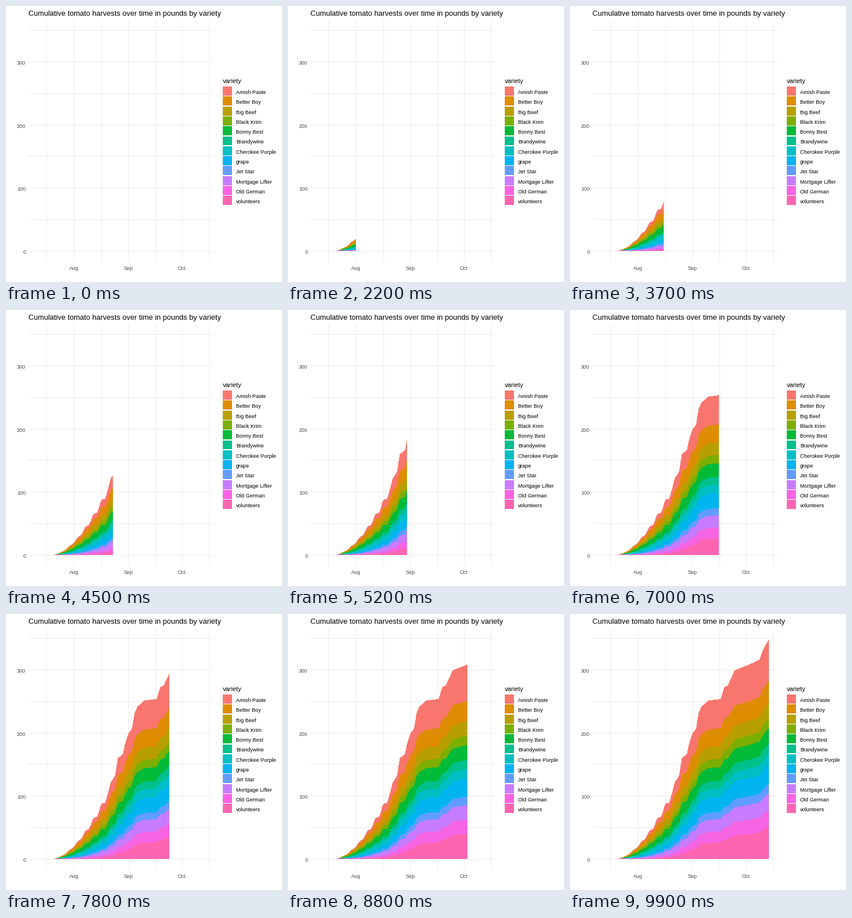
Animation, 480 px wide and 480 px high, one loop 10000 ms. Source, as a matplotlib script:

```python
import numpy as np
import matplotlib.pyplot as plt
from matplotlib.animation import FuncAnimation
from matplotlib.patches import Polygon, Rectangle

plt.rcParams["font.family"] = "Liberation Sans"

SIZE, DPI = 480, 72
FRAMES, INTERVAL = 100, 100
LAST_DAY, FIRST_PICK = 95, 10     # days since 11 July
DAY_0_X, DAY_WIDTH = 53.3, 3.077
BASE, POUND_HEIGHT = 426, 1.097
GRID, TICK = "#EBEBEB", "#4D4D4D"

# name: (colour, pounds at the end, lateness); lateness above 1 ripens late
VARIETIES = {
    "Amish Paste": ("#F8766D", 65.7, 1.15),
    "Better Boy": ("#DE8C00", 34.0, .6),
    "Big Beef": ("#B79F00", 25.0, .8),
    "Black Krim": ("#7CAE00", 15.8, .6),
    "Bonny Best": ("#00BA38", 24.9, .5),
    "Brandywine": ("#00C08B", 15.6, .85),
    "Cherokee Purple": ("#00BFC4", 15.7, .45),
    "grape": ("#00B4F0", 32.4, 1.03),
    "Jet Star": ("#619CFF", 15.0, .95),
    "Mortgage Lifter": ("#C77CFF", 26.3, 1.03),
    "Old German": ("#F564E3", 26.7, 1.4),
    "volunteers": ("#FF64B0", 50.5, 2.2),
}
COLORS, POUNDS, LATENESS = zip(*VARIETIES.values())

# Main season: (day, total pounds) where the picking pace changes.
PACE = [(40, 99.5), (42, 121), (44.5, 132), (46, 159), (49, 167), (50, 181),
        (52, 199), (54, 206), (55.5, 231), (57, 241), (61, 251), (68, 253.5),
        (70, 272), (72, 275), (76, 299), (84, 308), (90, 316), (92, 332),
        (95, 347)]


def total_pounds(day):
    """Power-law start with a pick every 4.5 days, then the main season."""
    early = 99.5 * ((day - FIRST_PICK) / 30) ** 1.67
    early *= 1 + .05 * np.sin(2 * np.pi * (day - 17.5) / 4.5)
    return np.where(day < 40, early + .9, np.interp(day, *zip(*PACE)))


def shares(total):
    """Part of the total for each variety, one row per variety."""
    progress = total / PACE[-1][1]
    weight = np.array([p * progress ** late for p, late in zip(POUNDS, LATENESS)])
    return weight / weight.sum(axis=0)


def day_at(frame):
    """Each day sits on its nearest frame; frames between are interpolated."""
    days = np.arange(LAST_DAY + 1)
    return np.interp(frame, np.round(days * (FRAMES - 1) / LAST_DAY), days)


fig = plt.figure(figsize=(SIZE / DPI, SIZE / DPI), dpi=DPI, facecolor="white")
ax = fig.add_axes([0, 0, 1, 1])
ax.set(xlim=(0, SIZE), ylim=(SIZE, 0))
ax.axis("off")


def label(x, y, text, size, color="black", ha="left"):
    ax.text(x, y, text, fontsize=size, color=color, ha=ha, va="baseline")


def grid_line(xs, ys):
    ax.plot(xs, ys, color=GRID, lw=1, snap=False, solid_capstyle="butt", zorder=1)


def draw_chart():
    for x in (70, 118, 166, 213, 260, 306, 353):
        grid_line([x + .5] * 2, [24, 445])
    for pounds in range(0, 351, 50):
        y = round(BASE - pounds * POUND_HEIGHT)
        grid_line([39, 360], [y + .5] * 2)
        if pounds % 100 == 0:
            label(34.3, y + 5, str(pounds), 9.1, TICK, "right")
    for x, month in ((118, "Aug"), (213, "Sep"), (305.7, "Oct")):
        label(x, 459, month, 9.1, TICK, "center")
    label(39, 17, "Cumulative tomato harvests over time in pounds by variety", 12.83)


def draw_legend():
    label(377, 134, "variety", 11.1)
    for i, (name, color) in enumerate(zip(VARIETIES, COLORS)):
        y = 139.6 + 17.28 * i
        top, bottom = round(y + .51), round(y + 16.49)
        ax.add_patch(Rectangle((377, top), 16, bottom - top, fc=color, lw=0))
        label(400, y + 13.4, name, 9.3)


draw_chart()
draw_legend()
layers = [ax.add_patch(Polygon([(0, 0)] * 3, fc=color, lw=0, antialiased=False,
                               zorder=2))
          for color in COLORS]


def update(frame):
    today = day_at(frame)
    days = np.append(np.arange(FIRST_PICK, today, .5), today)
    xs = DAY_0_X + DAY_WIDTH * days
    xs[-1] = round(xs[-1])
    total = total_pounds(days)
    height = total * POUND_HEIGHT - .4
    upper = BASE - height
    for layer, share in zip(layers, shares(total)):
        layer.set_visible(today > FIRST_PICK)
        lower = upper + height * share
        layer.set_xy(np.column_stack([np.append(xs, xs[::-1]),
                                      np.append(upper, lower[::-1])]))
        upper = lower
    return layers


animation = FuncAnimation(fig, update, frames=FRAMES, interval=INTERVAL,
                          repeat=True, repeat_delay=0)
plt.show()
```
